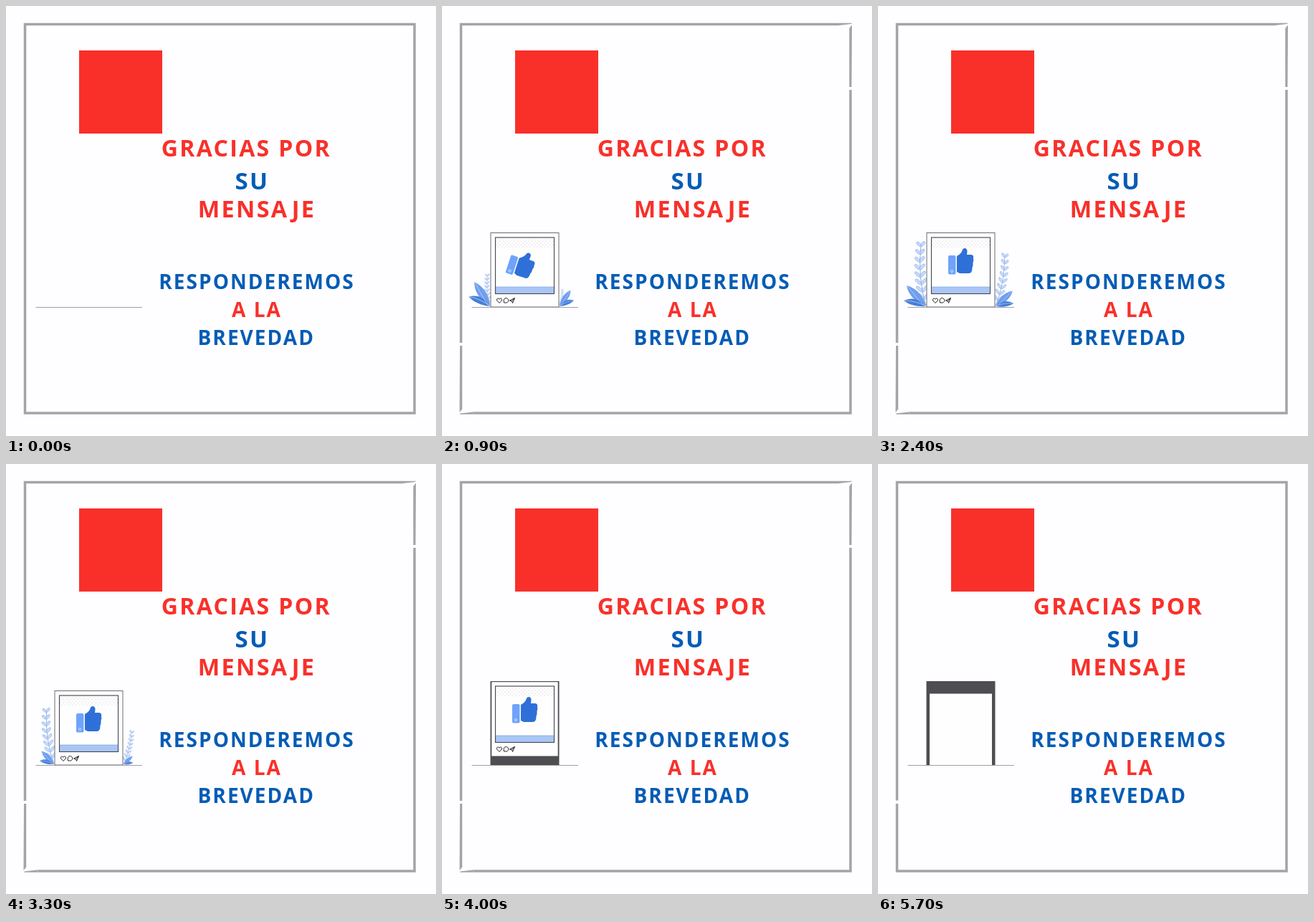
Recreate the animation shown at these times as an HTML page. Size 600 by 600 pixels, loop 5800 ms.

```html
<!DOCTYPE html>
<html lang="es">
<head>
<meta charset="utf-8">
<style>
  html, body { margin: 0; width: 100%; height: 100%; overflow: hidden; background: #fefdff; }
  svg { display: block; width: 100vw; height: 100vh; }
  text { font: bold 28px "Open Sans", "Noto Sans", sans-serif; letter-spacing: .073em; }
  .red { fill: #f9302a; }
  .blue { fill: #045cb5; }
  .icon { fill: none; stroke: #222; stroke-width: 1; stroke-linejoin: round; }
</style>
</head>
<body>
<svg viewBox="0 0 600 600">
  <defs>
    <clipPath id="ground"><rect x="20" y="280" width="190" height="140.5"/></clipPath>
    <clipPath id="glass"><rect x="74.5" y="323" width="82" height="78.5"/></clipPath>
    <clipPath id="slot"><rect id="slotBox"/></clipPath>
    <pattern id="dots" x="77" y="325" width="5" height="5" patternUnits="userSpaceOnUse">
      <circle cx="1" cy="1" r=".55" fill="#c6c8d2"/>
      <circle cx="3.5" cy="3.5" r=".55" fill="#c6c8d2"/>
    </pattern>
  </defs>

  <rect width="600" height="600" fill="#fefdff"/>
  <rect x="26.5" y="25.5" width="543.5" height="542.5" fill="none" stroke="#a4a3a6" stroke-width="3.5"/>
  <g id="bevels"></g>
  <rect id="leftGap" x="23" y="469.5" width="7" height="4.5" fill="#fefdff"/>

  <rect class="red" x="102" y="62" width="116" height="116"/>

  <text class="red" x="216.8" y="209.5" style="font-size:32px">GRACIAS POR</text>
  <text class="blue" x="319.5" y="256" style="font-size:33px">SU</text>
  <text class="red" x="267.8" y="295" style="font-size:32.3px">MENSAJE</text>
  <text class="blue" x="213.3" y="395">RESPONDEREMOS</text>
  <text class="red" x="315" y="434">A LA</text>
  <text class="blue" x="267.5" y="473">BREVEDAD</text>

  <g clip-path="url(#ground)">
    <g id="plants"></g>
    <g id="stand">
      <rect id="back" x="67.5" width="96" fill="#4e4d51"/>
      <rect id="panel" fill="#fefefe"/>
    </g>
    <g id="mask">
      <g id="card">
        <rect id="paper" x="68" y="316.5" width="95" height="103.5" fill="#fefefe" stroke="#6a6a6e"/>
        <rect x="74.5" y="323" width="82" height="14" fill="url(#dots)"/>
        <rect x="74.5" y="392" width="82" height="9.5" fill="#a9c6f5"/>
        <path d="M74.5 392H156.500" stroke="#7fa3dd" stroke-width=".7"/>
        <g clip-path="url(#glass)">
          <g id="hand">
            <rect x="98" y="348" width="10.5" height="26.5" rx="2" fill="#6fa3fa"/>
            <circle cx="103" cy="370" r="1.6" fill="none" stroke="#e4eeff" stroke-width=".8"/>
            <path fill="#2f70d8" d="M110 349C114 347 117 344 118 340C119 337 125 337 124.500 343L124 347H130Q134 347.500 133 352Q134 355 132.500 358Q133 362 131.500 365Q131.500 373 127 373H114L110 371Z"/>
          </g>
        </g>
        <rect x="74.5" y="323" width="82" height="78.5" fill="none" stroke="#44474f" stroke-width="1.1"/>
        <path class="icon" d="M80 414.500L76.700 411C75.500 408 79 407 80 409.300C81 407 84.500 408 83.300 411Z"/>
        <path class="icon" d="M86.500 414L86.200 411.500A3.300 3.300 0 1 1 88.500 414Z"/>
        <path class="icon" d="M94.500 411L101.500 407.500L98.500 414.500L97.500 411.800ZM97.500 411.800L101.500 407.500"/>
      </g>
    </g>
  </g>
  <path d="M41.500 420.500H190" stroke="#a0a0a3"/>
</svg>
<script>
const LOOP = 5800, STEP = 100;
const $ = id => document.getElementById(id);
const set = (el, attrs) => { for (const k in attrs) el.setAttribute(k, attrs[k]); };
const show = (id, on) => $(id).style.display = on ? "" : "none";

// Eased value between [time, value] keys.
function track(t, ...keys) {
  if (t <= keys[0][0]) return keys[0][1];
  for (let i = 1; i < keys.length; i++) {
    const [a, from] = keys[i - 1], [b, to] = keys[i];
    if (t <= b) {
      const p = (t - a) / (b - a);
      return from + (to - from) * p * p * (3 - 2 * p);
    }
  }
  return keys[keys.length - 1][1];
}

// Cut corner at the top right, reaching down to y = end.
const bevel = (end, turn) => `<g transform="${turn}">
  <rect x="566" y="22" width="8" height="${end - 18}" fill="#fefdff"/>
  <path d="M552 22H574V30H552Z" fill="#fefdff"/>
  <path d="M552 23.700H572L571 25L552 27.300ZM568.300 ${end}V31L572 26.500L571.500 ${end}Z" fill="#a4a3a6"/>
</g>`;
$("bevels").innerHTML = bevel(113, "") + bevel(119.5, "rotate(180 298.25 296.75)");

function fern() {
  let art = '<path d="M0 0Q-12 -40 -7 -86" fill="none" stroke="#7594cc" stroke-width=".8"/>';
  for (let i = 1; i <= 8; i++) {
    const p = i / 8, x = -24 * p * (1 - p) - 7 * p * p, y = -80 * p * (1 - p) - 84 * p * p;
    const size = 6.2 - 2.2 * p;
    for (const side of [-1, 1]) {
      art += `<ellipse cy="${-size}" rx="2" ry="${size}"
        transform="translate(${x} ${y}) rotate(${side * 44 - 4})"
        fill="#c9dcfb" stroke="#7ba2e6" stroke-width=".6"/>`;
    }
  }
  return art;
}
const leaves = `
  <path d="M0 0C-3 -13 -12 -25 -27 -29C-25 -17 -17 -7 0 0Z" fill="#6f9fee"/>
  <path d="M0 0C-9 -11 -20 -13 -31 -8C-24 -2 -12 1 0 0Z" fill="#477fd8"/>
  <path d="M0 0C-10 -5 -17 -19 -27 -29M0 0Q-14 -8 -31 -8" fill="none" stroke="#d7e5ff" stroke-width=".6"/>`;

// Each plant starts growing late by its lag and leaves early by the same amount.
const plants = [
  { place: "translate(67 419)", lag: 0 },
  { place: "translate(164 419) scale(-.8 .83) rotate(-6)", lag: 80 }
];
$("plants").innerHTML = plants.map(p =>
  `<g transform="${p.place}"><g>${fern()}</g><g>${leaves}</g></g>`).join("");
plants.forEach((p, i) => [p.fern, p.leaves] = $("plants").children[i].children);

function drawPlant({ fern, leaves, lag }, t) {
  const grow = t - lag, fade = t + lag;
  const leafSize = track(grow, [600, 0], [900, 1.02], [1200, 1])
    * track(fade, [3000, 1], [3300, .64], [3600, 0]);
  const leafTurn = track(grow, [600, 30], [900, 10], [1200, 0]);
  const fernSize = track(grow, [700, 0], [900, .5], [1200, 1.03], [1400, 1])
    * track(fade, [3200, 1], [3650, 0]);
  const fernTurn = track(fade, [3000, 0], [3400, -4]);
  set(leaves, { transform: `rotate(${leafTurn}) scale(${leafSize})` });
  set(fern, { transform: `rotate(${fernTurn}) scale(${fernSize})` });
}

function draw(t) {
  const leaving = t >= 3700;
  show("bevels", t >= 100 && t < 5400);
  show("leftGap", t >= 5700);
  show("card", t >= 100);
  show("stand", leaving);
  show("paper", !leaving);

  const cardY = track(t, [100, 104], [450, -10], [700, 0],
    [3700, 0], [3950, -13], [4050, -13], [4450, 104]);
  set($("card"), { transform: `translate(0 ${cardY})` });

  const handX = track(t, [650, -50], [900, -6], [1100, 1], [1250, 0]);
  const handY = track(t, [650, 12], [900, 4], [1100, -1], [1250, 0]);
  const tilt = track(t, [650, 35], [900, 18], [1100, -4], [1250, 0]);
  set($("hand"), { transform: `translate(${handX} ${handY}) rotate(${tilt} 116 360)` });

  plants.forEach(p => drawPlant(p, t));

  const top = track(t, [3700, 316], [3950, 303]);
  const side = track(t, [3700, 1], [4000, 1.8], [4450, 4.5]);
  const roof = track(t, [3700, 317], [3950, 304.2], [4050, 304.2], [4450, 320.5]);
  const foot = track(t, [3700, 420], [3950, 407.5], [4050, 407.5], [4450, 421]);
  const box = { x: 67.5 + side, y: roof, width: 96 - 2 * side, height: foot - roof };
  set($("back"), { y: top, height: 421 - top });
  set($("panel"), box);
  set($("slotBox"), box);
  set($("mask"), { "clip-path": leaving ? "url(#slot)" : "none" });
}

const start = performance.now();
function tick() {
  const t = Math.max(0, performance.now() - start) % LOOP;
  draw(Math.floor(t / STEP) * STEP);
  requestAnimationFrame(tick);
}
tick();
</script>
</body>
</html>
```
